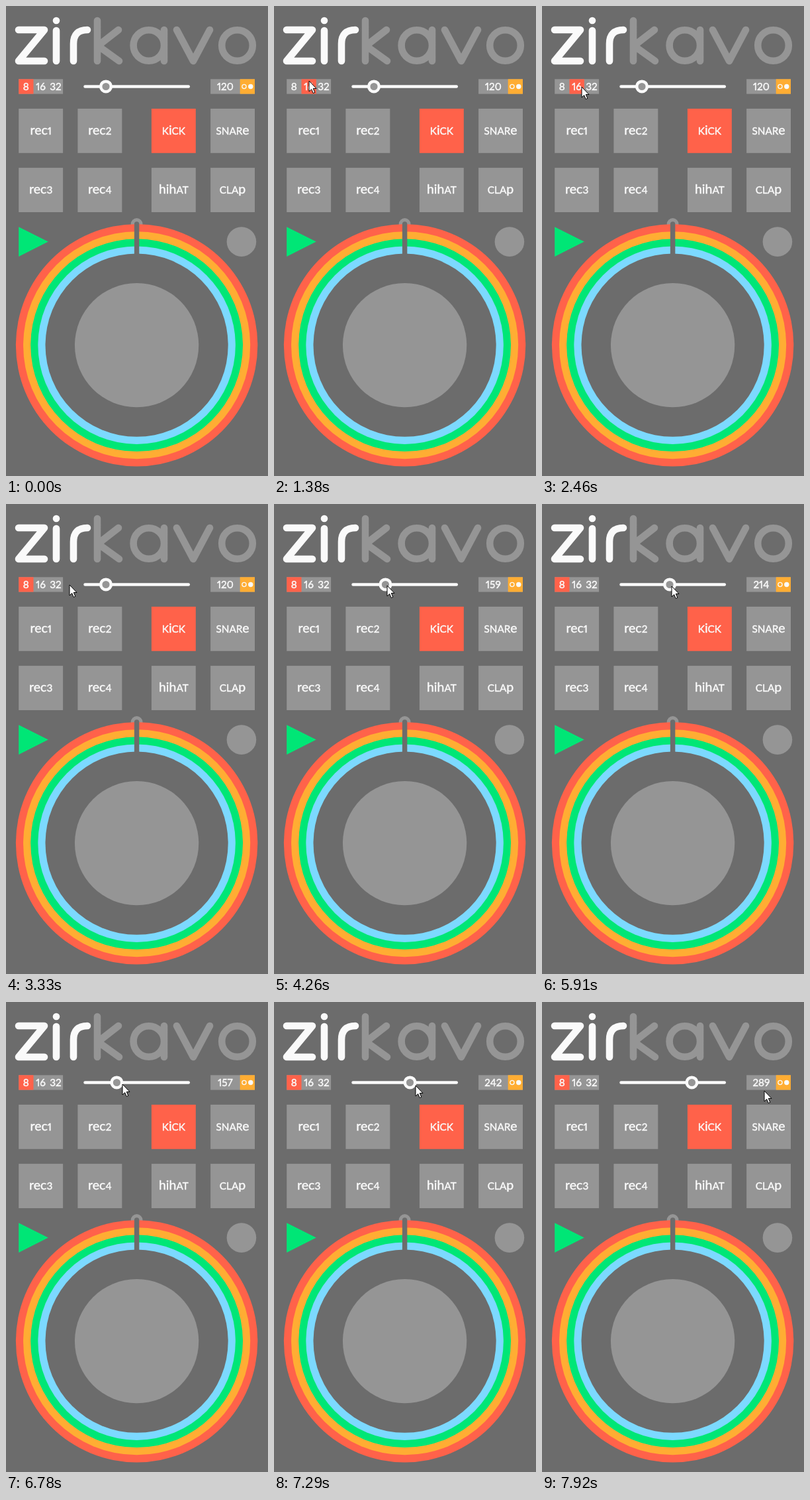
Write an HTML page that moves like this. It is 396 px wide and 709 px high and loops after 8000 ms.

```html
<!DOCTYPE html>
<html lang="en">
<head>
<meta charset="utf-8">
<title>Zirkavo</title>
<style>
  html, body { margin: 0; width: 100%; height: 100%; overflow: hidden; background: #6c6c6c; }
  svg { display: block; width: 100vw; height: 100vh; }
  text {
    font: 15.3px Lato, "Open Sans", sans-serif;
    font-variant-numeric: proportional-nums;
    text-anchor: middle; fill: #fafafa;
    stroke: #fafafa; stroke-width: .45; stroke-linejoin: round;
  }
  .low { font-size: 19.5px; }
  .line { fill: none; stroke-width: 10.6; stroke-linecap: round; stroke-linejoin: round; }
</style>
</head>
<body>
<svg id="stage" viewBox="0 0 396 709"></svg>
<script>
const C = {
  bg: '#6c6c6c', gray: '#959595', white: '#fafafa',
  red: '#ff624a', orange: '#ffad33', green: '#00e676', blue: '#7cd9ff'
};
const LOOP = 8000, STEP = 30;

// Everything sits on a grid of square units.
const U = 22.3, LEFT = 19.2, TOP = 110.3;
const gx = n => LEFT + n * U, gy = n => TOP + n * U;
const MID = gx(8), HUB = gy(18), BAR = gy(.5);

const rect = (x, y, w, h, fill, extra = '') =>
  `<rect x="${x}" y="${y}" width="${w}" height="${h}" fill="${fill}" ${extra}/>`;
const disc = (x, y, r, fill, extra = '') =>
  `<circle cx="${x}" cy="${y}" r="${r}" fill="${fill}" ${extra}/>`;
const line = (d, color) => `<path class="line" d="${d}" stroke="${color}"/>`;

// Unicase look: small letters are set larger so they stand as tall as capitals.
const label = (x, y, str, extra = '') =>
  `<text x="${x}" y="${y + 5.5}" ${extra}>` +
  str.replace(/[a-z]+/g, s => `<tspan class="low">${s}</tspan>`) + '</text>';

const title =
  '<g role="img" aria-label="Zirkavo">' +
  line('M138 22V83M170 36L139 60L171 83', C.gray) +
  line('M239 36V83M239 59.5a23.2 23.2 0 1 0 -46.4 0a23.2 23.2 0 1 0 46.4 0', C.gray) +
  line('M258 36L283 83L308 36', C.gray) +
  disc(349.5, 59.5, 23.3, 'none', `stroke="${C.gray}" stroke-width="10.6"`) +
  line('M19 36H58L19 83H58', C.white) +
  line('M76 37V83M76 22h.01', C.white) +
  line('M102 83V57Q102 36 123 36', C.white) + '</g>';

const steps =
  rect(gx(0), TOP, 3 * U, U, C.gray) +
  rect(gx(0), TOP, U, U, C.red, 'id="pick"') +
  ['8', '16', '32'].map((s, i) => label(gx(i + .5), BAR, s)).join('');

const tempo =
  rect(gx(13), TOP, 3 * U, U, C.gray) +
  rect(gx(15), TOP, U, U, C.orange) +
  disc(gx(15.28), BAR, 3.1, 'none', `stroke="${C.white}" stroke-width="1.3"`) +
  disc(gx(15.72), BAR, 3.7, C.white) +
  label(gx(14), BAR, '120', 'id="bpm"');

const names = ['rec1', 'rec2', 'KiCK', 'SNARe', 'rec3', 'rec4', 'hihAT', 'CLAp'];
const pads = names.map((name, i) => {
  const col = i % 4 * 4 + (i % 4 > 1), row = i < 4 ? 2 : 6;
  return rect(gx(col), gy(row), 3 * U, 3 * U, name === 'KiCK' ? C.red : C.gray) +
    label(gx(col + 1.5), gy(row + 1.5), name);
}).join('');

const wheel =
  disc(MID, 329, U * .4, C.gray) +
  [C.red, C.orange, C.green, C.blue, C.bg]
    .map((color, i) => disc(MID, HUB, 182.7 - i * U / 2, color)).join('') +
  `<path d="M${MID} 329V376" stroke="${C.bg}" stroke-width="${U / 3}" stroke-linecap="round"/>` +
  disc(MID, HUB, U * 4.2, C.gray);

const slider =
  `<path d="M119.5 ${BAR}H275.8" stroke="${C.white}" stroke-width="${U / 5}" stroke-linecap="round"/>` +
  disc(151, BAR, U * .35, C.gray, `id="knob" stroke="${C.white}" stroke-width="${U / 5}"`);

const play = `<path d="M${gx(0)} ${gy(10)}l${2 * U} ${U}l${-2 * U} ${U}Z" fill="${C.green}"/>`;

const arrow =
  `<path id="arrow" d="M0 0V16L3.7 12.6L6.2 18.5L8.8 17.4L6.3 11.5H11Z"
    fill="#fff" stroke="#000" stroke-linejoin="round"/>`;

const $ = id => document.getElementById(id);
$('stage').innerHTML = title + steps + slider + tempo + pads + play +
  disc(gx(15.1), gy(11), U, C.gray) + wheel + arrow;

const ENTER = 90;
// Hand moves: from ms, to ms, goal x, goal y
const moves = [
  [ENTER, 780, 53, 113],
  [1500, 1770, 78, 120],
  [2100, 2250, 60, 122],
  [2520, 2730, 30, 121],
  [3030, 3600, 154, 122],
  [3900, 5310, 237.5, 125],
  [5430, 6240, 170, 124],
  [6650, 7530, 227, 127],
  [7650, 7920, 336, 134]
];
const clicks = [1380, 1950, 2460, 2880];
// Knob drags: grab ms, release ms, distance from knob to arrow tip
const drags = [[3900, 6240, 3], [6270, 7680, 8.5]];

// Halfway between steady and smooth
const ease = u => (u + u * u * (3 - 2 * u)) / 2;

function hand(t) {
  let x = 348, y = 51;
  for (const [from, to, gx, gy] of moves) {
    const k = ease(Math.min(1, Math.max(0, (t - from) / (to - from))));
    x += (gx - x) * k;
    y += (gy - y) * k;
  }
  return { x, y };
}

const last = (list, test) => list.filter(test).pop();

function draw(now) {
  const t = Math.floor(now % LOOP / STEP) * STEP;
  const tip = hand(t);

  const click = last(clicks, c => c <= t);
  const cell = click ? Math.floor((hand(click).x - LEFT) / U) : 0;
  $('pick').setAttribute('x', gx(cell));

  const drag = last(drags, d => d[0] <= t);
  const knob = drag ? hand(Math.min(t, drag[1])).x - drag[2] : 151;
  $('knob').setAttribute('cx', knob);
  $('bpm').textContent = Math.round(120 + (knob - 151) * 50 / U);

  $('arrow').setAttribute('visibility', t < ENTER ? 'hidden' : 'visible');
  $('arrow').setAttribute('transform', `translate(${Math.round(tip.x)} ${Math.round(tip.y)})`);
}

const start = performance.now();
function tick() {
  draw(performance.now() - start);
  requestAnimationFrame(tick);
}
tick();
</script>
</body>
</html>
```
